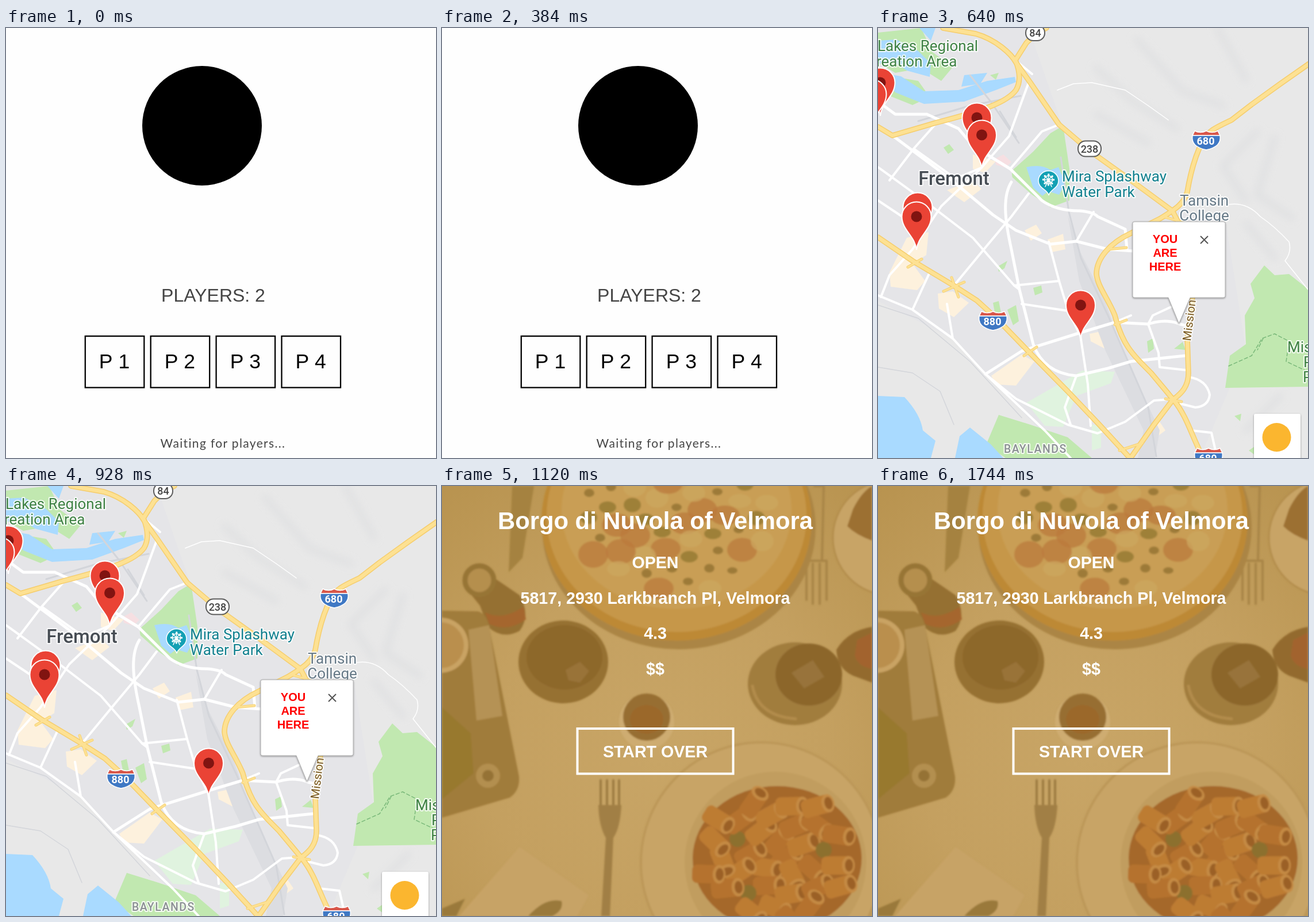
An HTML page that plays this animation: 748 px wide and 748 px high, repeating every 2.16 s.

```html
<!DOCTYPE html>
<html lang="en">
<head>
<meta charset="utf-8">
<title>Pick a place</title>
<style>
html, body { margin: 0; width: 100%; height: 100%; overflow: hidden; background: #fefefe; }
svg { display: block; width: 100vw; height: 100vh; }
.hide { display: none; }
.sans { font-family: "Liberation Sans", Arial, sans-serif; }
.mid { text-anchor: middle; }
.label { font: 26px Roboto, sans-serif; paint-order: stroke; stroke: #fffc; stroke-width: 4px; stroke-linejoin: round; }
.line { fill: none; stroke-linecap: round; stroke-linejoin: round; }
</style>
</head>
<body>
<svg viewBox="0 0 748 748">
<defs>
  <g id="pin">
    <path d="M0 1C-2-23-25.500-33-25.500-57a25.500 25.500 0 0 1 51 0C25.500-33 2-23 0 1z" fill="#ea4335" stroke="#fff" stroke-width="2"/>
    <circle cy="-57" r="9.500" fill="#811411"/>
  </g>
  <g id="shield" stroke="#fff" stroke-width="1.500">
    <path d="M-20-16Q-10-11 0-16Q10-11 20-16L24-8H-24z" fill="#d8574a"/>
    <path d="M-24-8H24C26 6 18 13 0 17C-18 13-26 6-24-8z" fill="#3f78c4"/>
  </g>
  <g id="highways">
    <path d="M0 364L60 405L130 447L172 474L205 504L265 566L330 632L385 690L440 750"/>
    <path d="M750 62L700 97L650 133L615 160C590 172 575 178 565 196C550 225 543 255 538 285C533 305 518 315 490 332L440 357C405 373 380 400 380 428C382 450 400 470 412 500C425 550 440 565 475 600L515 648C540 680 545 710 567 750"/>
    <path d="M113 0L170 10C205 20 232 45 240 60L265 95L315 168L370 215L440 265L512 318L526 345L549 440L546 480L538 540L540 600C540 630 520 640 512 648L480 690L438 750"/>
    <path d="M293 0Q275 8 258 26L239 56Q252 88 240 108C225 128 190 142 100 165L25 187L0 172"/>
  </g>
  <g id="ramps">
    <path d="M500 329L530 338M400 385L432 382M114 458L150 442M128 434L140 468M254 570L276 555M412 516L432 508M500 645L528 650M52 416L76 402M420 735L460 722"/>
  </g>
  <filter id="soft"><feGaussianBlur stdDeviation="1.600"/></filter>
  <filter id="haze"><feGaussianBlur stdDeviation="7"/></filter>
  <filter id="drop"><feDropShadow dx="0" dy="1" stdDeviation="1.500" flood-opacity=".4"/></filter>
  <radialGradient id="cloth" cx=".5" cy=".62" r=".8">
    <stop offset="0" stop-color="#c8a566"/><stop offset=".5" stop-color="#c4a060"/><stop offset="1" stop-color="#b8934f"/>
  </radialGradient>
</defs>

<!-- Lobby -->
<g class="scene sans">
  <rect width="748" height="748" fill="#fefefe"/>
  <circle cx="341" cy="170" r="104"/>
  <text x="360.500" y="476" font-size="32" fill="#444" class="mid">PLAYERS: 2</text>
  <g id="seats" font-size="35.500" class="mid" style="font-kerning:none"></g>
  <text x="268.500" y="730" fill="#444" style="font:21px Lato,sans-serif;letter-spacing:1.35px">Waiting for players...</text>
</g>

<!-- Map -->
<g class="scene hide">
  <rect width="748" height="748" fill="#e5e5e8"/>
  <path d="M262 0L320 168L512 318L605 338L640 560L560 748H748V0zM0 475L130 540L187 602L330 748H0z" fill="#e8e8e8"/>
  <g class="line" filter="url(#haze)" stroke="#dcdddf" stroke-width="10" opacity=".7">
    <path d="M380 70L440 125L520 175M450 20L530 110L600 135M590 0L640 90M660 180L600 240L640 300M690 190L660 290L720 330M640 340L690 400M380 150L470 200M700 640L640 700"/>
  </g>
  <g fill="#fdf1dd">
    <path d="M165 220L205 232L186 252L165 245zM120 282L165 265L180 280L150 303zM50 365L88 355L84 395L60 410L82 440L68 456L22 450L20 425zM104 462L130 458L158 478L132 503L106 488zM255 352L275 342L285 357L266 370zM295 368L322 358L326 385L302 390zM368 532L400 525L412 545L395 558L370 545zM197 605L250 568L272 580L240 622L205 620zM470 690L490 685L500 700L480 715z"/>
  </g>
  <path d="M330 325L352 390L395 475L425 560L490 700L482 748H452L462 700L395 560L350 440z" fill="#dcdde1"/>
  <g fill="#c1e8b0">
    <path d="M300 183L322 170L333 245L333 300L300 312L268 290L234 260Q230 248 240 242L270 215z"/>
    <path d="M672 413L690 430L715 428L748 454V624L604 626L612 570L640 550L638 500L655 470L648 445z"/>
    <path d="M210 673L265 690L330 712L372 748H222L188 725z"/>
    <path d="M0 8L75 0L95 42L130 68L110 92L75 70L30 78L0 60zM0 80L70 92L90 120L60 134L20 118z"/>
    <path d="M114 208L124 202L132 212L122 219zM208 415L225 405L220 418L210 424zM270 452L284 448L286 460L273 465zM200 478L210 475L215 500L205 505zM225 490L240 482L245 510L235 517zM468 545L478 540L480 558L470 565zM620 675L632 671L630 684zM195 82L210 78L205 90zM515 558L530 546L535 560zM645 735L655 728L656 743z"/>
  </g>
  <path d="M258 652L355 596L412 598L405 618L345 640L322 694L290 692zM372 690L388 692L388 730L372 735z" fill="#e0f3df"/>
  <path d="M203 228L218 220L232 233L222 243L205 238z" fill="#f6dfe2"/>
  <g fill="#a9daff">
    <path d="M0 22L32 20L70 40L92 62L90 85L50 74L30 60L0 62zM5 78L40 84L80 110L140 108L190 92L238 85L240 94L205 108L150 128L80 132L30 112zM72 0H100L92 22zM150 82L190 78L178 97L145 102z"/>
    <path d="M258 242Q285 236 300 247L314 242L326 270L315 290L296 284L286 292L270 278z"/>
    <path d="M0 640L46 642Q74 672 78 700L100 718L92 748H0zM134 748L142 710L160 695L196 724L218 748z"/>
  </g>
  <g class="line" stroke="#d3d5da">
    <path d="M70 162L160 135L248 118M160 82L196 128L245 200M212 145L240 190M318 225L332 320L353 400L400 500L470 660L484 745" stroke-width="3"/>
    <path d="M0 482L70 505L160 580L250 678M0 590L60 600L108 632L132 690" stroke-width="1.500"/>
  </g>
  <g class="line" stroke="#fff" stroke-width="4">
    <path d="M0 128L30 150L85 150L140 175L165 205L230 245L285 300Q310 318 350 318Q375 320 382 328L430 350L433 385" stroke-width="5"/>
    <path d="M25 187L120 258L200 325L240 352L300 376L345 371L400 385L445 388" stroke-width="5"/>
    <path d="M0 242L80 300L165 365L237 448L315 440M0 300L45 330M62 210L20 265M102 165L62 210L135 262L180 243"/>
    <path d="M5 468L20 430L60 385L110 310L180 243L228 188L262 95M240 57L268 80M133 447L190 378L232 328L262 288M230 245L285 180L315 168"/>
    <path d="M232 268C215 295 222 340 232 385L246 455L270 550Q288 600 345 605L400 592L440 580L535 570" stroke-width="5"/>
    <path d="M297 372L315 440L330 490L352 535L365 620L370 692M250 480L330 492M246 455L237 448"/>
    <path d="M187 602L250 562L352 530L412 512L470 515Q500 505 525 515L545 520" stroke-width="5"/>
    <path d="M0 465L60 490L130 540L187 602L290 700L335 748M187 602L240 645L330 690L382 705L430 685L480 648L520 645M345 371L375 320M60 490L90 425M130 540L120 480"/>
    <path d="M540 607Q572 612 577 638Q575 658 552 660L520 652M412 512L440 500M470 515L478 500L510 485M470 515L488 565L490 590L535 595M545 700L580 704L590 748M345 605L325 660L335 690"/>
    <path d="M312 108L340 97L372 95L430 108L470 135L505 160M604 308Q640 300 665 328Q690 345 715 372Q720 390 708 405L748 455" stroke-width="1.500"/>
  </g>
  <path d="M610 588L650 570L668 540L690 532L715 545L710 580L748 598M670 540L660 560" class="line" stroke="#79b879" stroke-width="1.500" stroke-dasharray="6 4"/>
  <g class="line">
    <use href="#ramps" stroke="#f7d377" stroke-width="5"/>
    <use href="#highways" stroke="#f5cd6c" stroke-width="9.500"/>
    <use href="#highways" stroke="#fde193" stroke-width="6.500"/>
    <use href="#ramps" stroke="#fde193" stroke-width="3"/>
  </g>

  <g class="label">
    <g fill="#3f8244">
      <text x="-1" y="40">Lakes Regional</text>
      <text x="-3" y="67">reation Area</text>
      <text x="712" y="564">Miss</text><text x="740" y="590">P</text><text x="739" y="616">P</text>
    </g>
    <g fill="#12818f">
      <text x="320" y="267">Mira Splashway</text><text x="320" y="293.500">Water Park</text>
    </g>
    <g fill="#667987" class="mid">
      <text x="567.500" y="309">Tamsin</text><text x="567.500" y="335">College</text>
    </g>
    <text x="132" y="273" fill="#474d54" class="mid" style="font-size:33px;font-weight:500">Fremont</text>
    <text x="219" y="739" fill="#8c9095" style="font-size:19.500px;font-weight:500;letter-spacing:1.5px">BAYLANDS</text>
    <text transform="translate(544 545) rotate(-83)" fill="#795a24" style="font-size:20.500px">Mission</text>
  </g>
  <path d="M297 291C295 281 279 279 279 266a17.500 17.500 0 0 1 35 0C314 279 299 281 297 291z" fill="#13a0b4" stroke="#fff" stroke-width="1.500"/>
  <g class="line" stroke="#fff" stroke-width="1.600">
    <circle cx="296.500" cy="264" r="7"/>
    <path d="M289.500 264H303.500M296.500 257V271M291.500 259L301.500 269M301.500 259L291.500 269M296.500 264L291 276M296.500 264L302 276"/>
    <circle cx="296.500" cy="264" r="9" stroke-dasharray="0 7.070" stroke-width="3.500"/>
  </g>
  <g fill="#fff" stroke="#5c5c5c" stroke-width="2">
    <rect x="257" y="-5" width="33" height="27" rx="13"/><rect x="348" y="196.500" width="40" height="27" rx="13"/>
  </g>
  <use href="#shield" x="571" y="195"/><use href="#shield" x="200" y="509"/><use href="#shield" x="575" y="747"/>
  <g class="mid" style="font:500 18px Roboto,sans-serif" fill="#444">
    <text x="273.500" y="15">84</text><text x="368" y="216.500">238</text>
    <g fill="#fff" font-weight="700"><text x="570" y="203">680</text><text x="199" y="517">880</text><text x="574" y="755">680</text></g>
  </g>
  <use href="#pin" x="4" y="152"/><use href="#pin" x="-11" y="172"/>
  <use href="#pin" x="172" y="213"/><use href="#pin" x="180.500" y="243"/>
  <use href="#pin" x="69" y="369"/><use href="#pin" x="67" y="385"/><use href="#pin" x="352.500" y="539"/>

  <path d="M446 337H601Q604 337 604 340V466Q604 469 601 469H543L523.500 514L505 469H446Q443 469 443 466V340Q443 337 446 337z" fill="#fff" stroke="#aaa" filter="url(#drop)"/>
  <g class="sans mid" font-size="20" font-weight="700" fill="#f00">
    <text x="499.500" y="374">YOU</text><text x="499.500" y="398">ARE</text><text x="499.500" y="422">HERE</text>
  </g>
  <path d="M561 362L574 375M574 362L561 375" stroke="#555" stroke-width="2"/>
  <rect x="654" y="671" width="81" height="90" rx="3" fill="#fff" filter="url(#drop)"/>
  <circle cx="693.500" cy="712" r="25" fill="#fbb62f"/>
</g>

<!-- Result -->
<g class="scene hide sans">
  <rect width="748" height="748" fill="url(#cloth)"/>
  <g filter="url(#soft)">
    <path d="M122 0H160L140 125L116 150z" fill="#a5823f"/>
    <circle cx="780" cy="90" r="100" fill="#c8a466" stroke="#b38d4c" stroke-width="3"/>
    <path d="M715 40Q730 10 748 0V95Q720 85 705 70z" fill="#9c6f31"/>
    <path d="M648 0H664L661 130H669V198M661 130H634V198M645 135V205M657 135V205" class="line" stroke="#a98547" stroke-width="4"/>
    <ellipse cx="412" cy="72" rx="238" ry="212" fill="#ab8545"/>
    <ellipse cx="408" cy="60" rx="235" ry="209" fill="#bd8936"/>
    <ellipse cx="408" cy="52" rx="226" ry="202" fill="#c6974a"/>
    <ellipse cx="408" cy="42" rx="200" ry="172" fill="#c99e54"/>
    <g id="toppings"></g>
    <path d="M42 178L88 158L135 190Q155 225 135 252Q105 268 80 245L66 208z" fill="#957030"/>
    <path d="M75 220Q105 235 142 210L146 232Q115 255 82 240z" fill="#a5662d"/>
    <circle cx="65" cy="164" r="25" fill="#b58f4e" stroke="#977435" stroke-width="9"/>
    <path d="M0 217L62 218Q78 222 82 245L134 505Q136 530 118 542L0 577z" fill="#a07c3b"/>
    <path d="M46 250L82 242L105 400L60 408z" fill="#b59254"/>
    <path d="M0 385L50 430L55 500L0 545z" fill="#98792f"/>
    <circle cx="-2" cy="277" r="48" fill="#c9a364"/><circle cx="-2" cy="277" r="40" fill="#ba8f4d"/>
    <circle cx="80" cy="504" r="21" fill="#b38f50"/><circle cx="80" cy="504" r="10" fill="#957235"/>
    <ellipse cx="211" cy="306" rx="78" ry="72" fill="#967131"/><ellipse cx="213" cy="298" rx="66" ry="56" fill="#8d672a"/>
    <path d="M215 320L240 306L256 322L240 342L220 338z" fill="#997338"/>
    <ellipse cx="614" cy="344" rx="82" ry="72" fill="#a17d3e"/><ellipse cx="638" cy="328" rx="58" ry="54" fill="#8c662b"/>
    <path d="M608 325L645 303L665 332L630 352z" fill="#98733a"/>
    <path d="M540 348Q550 400 615 405" class="line" stroke="#b28c4b" stroke-width="5"/>
    <path d="M748 245Q705 252 686 285Q688 318 715 330L748 342z" fill="#936b2e"/>
    <path d="M722 268L748 255V318Q724 315 718 295z" fill="#a2632d"/>
    <circle cx="356" cy="410" r="48" fill="#ceac71"/><circle cx="356" cy="402" r="41" fill="#976e30"/>
    <ellipse cx="356" cy="406" rx="29" ry="25" fill="#9b682c"/>
    <path d="M30 748L135 628L255 712L235 748z" fill="#c7a366"/>
    <path d="M150 748Q180 715 208 722Q212 738 192 748zM0 748V735L40 718L25 748z" fill="#9a793a"/>
    <circle cx="555" cy="655" r="209" fill="#c8a466" stroke="#bc9758" stroke-width="4"/>
    <circle cx="580" cy="655" r="158" fill="#c19d5e"/>
    <path d="M276 512V565Q278 588 291 592Q306 586 308 565V512M287 512V572M298 512V572" class="line" stroke="#9d7c42" stroke-width="4"/>
    <path d="M272 555H312Q310 595 298 612L292 748H277L285 612Q273 592 272 555z" fill="#a17f44"/>
    <ellipse cx="583" cy="648" rx="147" ry="126" fill="#a5682a"/>
    <g id="pasta"></g>
  </g>
  <g class="mid" fill="#fff" font-weight="700" font-size="28.600">
    <text x="371" y="75" font-size="41.800">Borgo di Nuvola of Velmora</text>
    <text x="371" y="143">OPEN</text>
    <text x="371" y="204.500">5817, 2930 Larkbranch Pl, Velmora</text>
    <text x="371" y="266">4.3</text>
    <text x="371" y="328">$$</text>
    <text x="371" y="472">START OVER</text>
  </g>
  <rect x="235.500" y="422" width="271" height="78.500" fill="none" stroke="#fff" stroke-width="4"/>
</g>
</svg>
<script>
const fill = (id, n, part) => {
  document.getElementById(id).innerHTML = Array.from({ length: n }, (_, i) => part(i)).join("");
};
let seed = 11;
const rnd = () => (seed = seed * 16807 % 2147483647) / 2147483647;
// Even spiral of points inside an ellipse
const spot = (i, n, cx, cy, rx, ry) => {
  const r = Math.sqrt((i + .5) / n), a = i * 2.4;
  return [cx + rx * r * Math.cos(a), cy + ry * r * Math.sin(a)].map(Math.round);
};

fill("seats", 4, i => {
  const x = 137.8 + 113.9 * i;
  return `<rect x="${x}" y="536" width="102.5" height="89.5" fill="none" stroke="#000" stroke-width="2.3"/>
    <text x="${x + 50.7}" y="592">P ${i + 1}</text>`;
});

const kinds = [["#bb7a3c", 26], ["#8f752f", 15], ["#cda75f", 20], ["#8d6e2f", 9]];
fill("toppings", 48, i => {
  const [x, y] = spot(i, 48, 405, 65, 168, 125);
  const [color, size] = kinds[Math.floor(rnd() * kinds.length)];
  return `<ellipse cx="${x}" cy="${y}" rx="${size}" ry="${size * (.6 + rnd() * .3)}" fill="${color}" opacity=".75"/>`;
});

fill("pasta", 34, i => {
  const [x, y] = spot(i, 34, 583, 648, 132, 112);
  if (rnd() < .1) return `<circle cx="${x}" cy="${y}" r="14" fill="#8c702f"/>`;
  return `<g transform="translate(${x} ${y}) rotate(${rnd() * 140 - 70})">
    <rect x="-27" y="-16" width="52" height="32" rx="9" fill="${i % 2 ? "#bd7c33" : "#b5722d"}"/>
    <ellipse cx="20" rx="11" ry="16" fill="#c58b44"/><ellipse cx="21" rx="7" ry="11" fill="#9b6125"/></g>`;
});

const scenes = document.querySelectorAll(".scene");
const start = performance.now();
function draw() {
  const t = (performance.now() - start) % 2160;
  const now = t < 640 ? 0 : t < 1120 ? 1 : 2;
  scenes.forEach((s, i) => s.classList.toggle("hide", i != now));
  requestAnimationFrame(draw);
}
draw();
</script>
</body>
</html>
```
